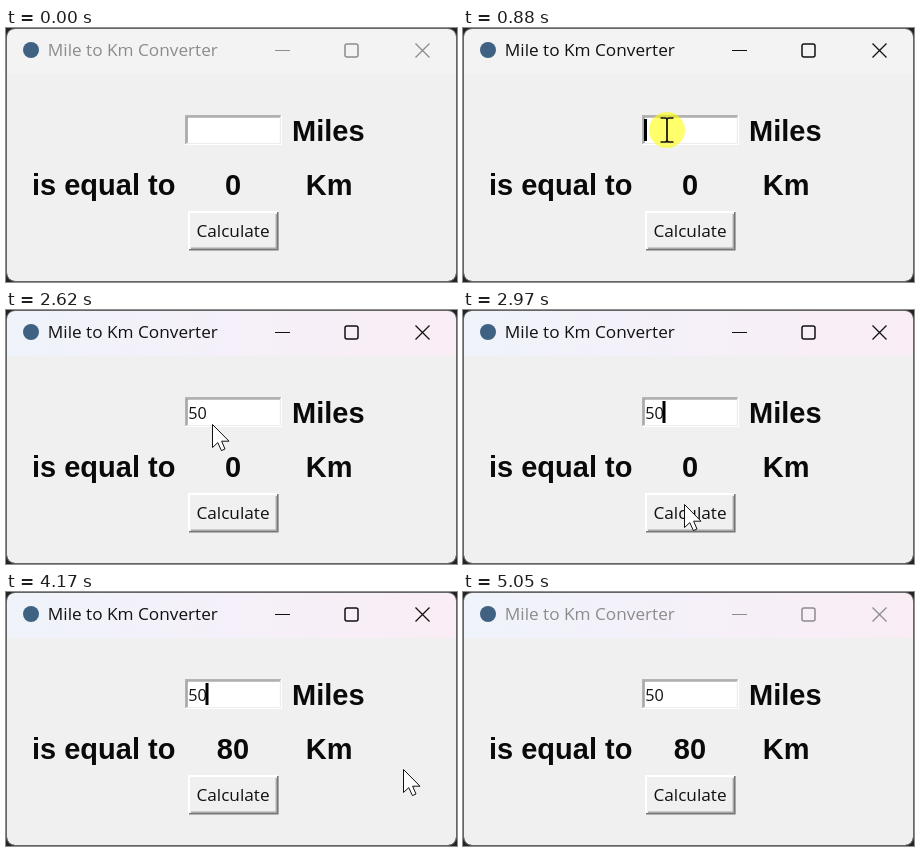
These frames come from a looping animation (451x254 px, 5.12 s). An HTML page:

```html
<!DOCTYPE html>
<html lang="en">
<head>
<meta charset="utf-8">
<title>Mile to Km Converter</title>
<style>
  html, body { margin: 0; width: 100%; height: 100%; overflow: hidden; background: #242424; }
  svg { display: block; width: 451px; height: 254px; }
  .ui { font-family: "Open Sans", "Noto Sans", sans-serif; font-size: 17.2px; }
  #entry { font-size: 16.2px; }
  .label { font: bold 29px "Liberation Sans", Arial, sans-serif; fill: #0a0a0a; }
</style>
</head>
<body>
<svg viewBox="0 0 451 254">
  <defs>
    <linearGradient id="tint">
      <stop offset="0" stop-color="#eff3fa"/>
      <stop offset=".5" stop-color="#f5f0f9"/>
      <stop offset="1" stop-color="#faedf5"/>
    </linearGradient>
    <clipPath id="window"><rect x="1" y="1" width="449" height="252" rx="8"/></clipPath>
  </defs>

  <g clip-path="url(#window)">
    <rect width="451" height="254" fill="#f0f0f0"/>
    <rect width="451" height="46" fill="#f3f3f3"/>
    <rect id="titleTint" width="451" height="46" fill="url(#tint)"/>
  </g>
  <rect x=".5" y=".5" width="450" height="253" rx="8.5" fill="none" stroke="#666"/>

  <circle cx="25" cy="22" r="8" fill="#3f6282"/>
  <g id="titleBar">
    <text class="ui" x="41.8" y="28.3" fill="currentColor">Mile to Km Converter</text>
    <path d="M269 22.5h15" stroke="currentColor"/>
    <path d="M409.5 15.5l14 14m0-14l-14 14" stroke="currentColor" stroke-width="1.3"/>
    <rect x="339" y="16" width="13" height="13" rx="2" fill="none" stroke="currentColor" stroke-width="1.5"/>
  </g>

  <rect x="179" y="87" width="97" height="30" fill="#fff"/>
  <path d="M179.7 116V87.7H275" fill="none" stroke="#b4b4b4" stroke-width="1.4"/>
  <path d="M181 115V89H274" fill="none" stroke="#858585" stroke-width="1.2"/>
  <path d="M181 115.5H274.4V89" fill="none" stroke="#ececec" stroke-width="1.2"/>
  <text id="entry" class="ui" x="182.3" y="108.7" fill="#111"></text>
  <rect id="caret" y="91" width="3" height="22"/>

  <text class="label" x="286" y="113">Miles</text>
  <text class="label" x="26" y="167">is equal to</text>
  <text class="label" x="227" y="167" text-anchor="middle" id="result">0</text>
  <text class="label" x="299.8" y="167">Km</text>

  <rect x="182" y="183" width="91" height="40" fill="#f0f0f0"/>
  <path id="edgeTop" d="M183 222V184H272" fill="none" stroke-width="2"/>
  <path id="edgeBottom" d="M183 221.8H271.8V184" fill="none" stroke-width="1.6"/>
  <path id="edgeInner" d="M185 220.3H270.3V186" fill="none" stroke="#a8a8a8" stroke-width="1.4"/>
  <text id="caption" class="ui" x="227" y="209.4" text-anchor="middle" fill="#111">Calculate</text>

  <g id="pointer">
    <circle id="halo" r="18" fill="#ff0" opacity=".58"/>
    <path id="arrow" d="M.5 .5V23.5L5.8 18.6L9.4 26.6L13 25L9.6 17.2H17Z" fill="#fff" stroke="#111"/>
    <path id="beam" d="M-6.5-12h4.5q2 0 2 2v20q0 2-2 2h-4.5M6.5-12h-4.5q-2 0-2 2M0 10q0 2 2 2h4.5" fill="none" stroke="#111" stroke-width="1.7"/>
  </g>
</svg>
<script>
const LOOP = 5120, STEP = 70;
const part = {};
document.querySelectorAll("[id]").forEach(el => part[el.id] = el);

// time, x, y
const path = [
  [200, 367, 235], [670, 179, 95], [740, 190, 100], [880, 204, 102], [1160, 209, 103],
  [2619, 209, 103], [2620, 206, 114], [2970, 221, 194], [3109, 221, 194],
  [3110, 222, 201], [3179, 222, 201], [3180, 221, 194], [4169, 221, 194],
  [4170, 397, 177], [4440, 390, 165]
];
const caretOn = [[870, 1490], [1820, 2420], [2720, 3310], [3640, 4240], [4580, 5050]];

const within = (t, from, to) => t >= from && t < to;
const show = (el, on) => el.setAttribute("visibility", on ? "visible" : "hidden");

// The pointer advances in steps, as a screen recorder samples it.
function pointerAt(t) {
  const i = path.findIndex((key, k) => k + 1 < path.length && within(t, key[0], path[k + 1][0]));
  if (i < 0) return null;
  const [t0, x0, y0] = path[i], [t1, x1, y1] = path[i + 1];
  const f = Math.floor((t - t0) / STEP) * STEP / (t1 - t0);
  return [x0 + (x1 - x0) * f, y0 + (y1 - y0) * f];
}

function draw(t) {
  const active = within(t, 740, 5050);
  part.titleBar.setAttribute("color", active ? "#111" : "#8c8c8c");
  const fade = (Math.floor(t / STEP) * STEP - 840) / 280;
  part.titleTint.setAttribute("opacity", Math.max(0, Math.min(1, fade)));

  const typed = t < 2020 ? "" : t < 2150 ? "5" : "50";
  part.entry.textContent = typed;
  part.caret.setAttribute("x", [181, 190, 199.5][typed.length]);
  show(part.caret, caretOn.some(([from, to]) => within(t, from, to)));
  part.result.textContent = t < 3180 ? "0" : "80";

  const pressed = within(t, 3110, 3180);
  part.edgeTop.setAttribute("stroke", pressed ? "#777" : "#fff");
  part.edgeBottom.setAttribute("stroke", pressed ? "#fff" : "#777");
  show(part.edgeInner, !pressed);
  part.caption.setAttribute("transform", pressed ? "translate(1 1)" : "");

  const at = pointerAt(t);
  const overEntry = at && within(at[0], 180, 276) && within(at[1], 88, 113);
  if (at) part.pointer.setAttribute("transform", `translate(${at})`);
  show(part.halo, pressed || within(t, 670, 950));
  show(part.arrow, at && !overEntry);
  show(part.beam, overEntry);
}

const start = performance.now();
function frame() {
  draw((performance.now() - start) % LOOP);
  requestAnimationFrame(frame);
}
frame();
</script>
</body>
</html>
```
